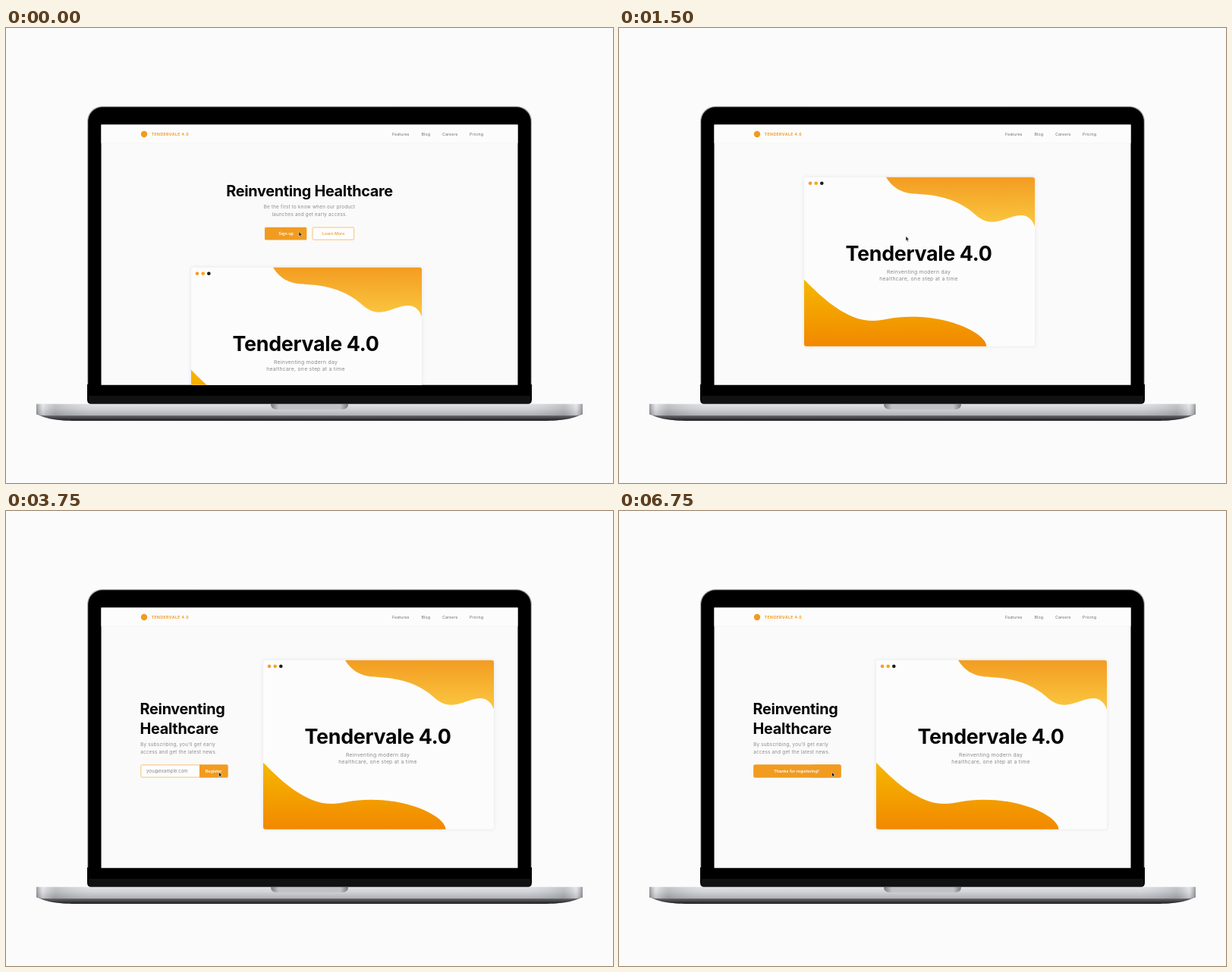
Recreate the animation shown at these times as an HTML page. Size 800 by 600 pixels, loop 8.25 s.

```html
<!DOCTYPE html>
<html lang="en">
<head>
<meta charset="utf-8">
<title>Landing page on a laptop</title>
<style>
html, body { margin: 0; width: 100%; height: 100%; overflow: hidden; background: #fbfbfb; }
svg { display: block; width: 100vw; height: 100vh; }
text { font-family: Inter, "Open Sans", sans-serif; }
.head { font-size: 19.8px; font-weight: 700; letter-spacing: -.28px; fill: #050505; }
.big { font-size: 26.8px; font-weight: 700; letter-spacing: -.3px; fill: #050505; }
.para { font-size: 6.2px; letter-spacing: .28px; fill: #8a8a8a; }
.sub { font-size: 6.8px; letter-spacing: .28px; fill: #8a8a8a; }
.nav { font-size: 5.3px; letter-spacing: .1px; fill: #707070; }
.brand { font-size: 5px; font-weight: 700; letter-spacing: .52px; fill: #f39a1e; }
.label { font-size: 5.3px; font-weight: 600; letter-spacing: .05px; fill: #fff; }
.mail { font-size: 5.9px; letter-spacing: .1px; fill: #858585; }
.mid { text-anchor: middle; }
.fill { fill: #f19b20; }
.line { fill: #fdfdfd; stroke: #f6bb66; stroke-width: .9; }
</style>
</head>
<body>
<svg viewBox="0 0 800 600">
  <defs>
    <linearGradient id="topWave" x2="0" y2="1">
      <stop stop-color="#f39c22"/><stop offset="1" stop-color="#fac840"/>
    </linearGradient>
    <linearGradient id="lowWave" x2="0" y2="1">
      <stop stop-color="#f5b800"/><stop offset="1" stop-color="#f28800"/>
    </linearGradient>
    <linearGradient id="silver" x2="0" y2="1">
      <stop stop-color="#dddfe3"/><stop offset=".4" stop-color="#cdcfd4"/><stop offset="1" stop-color="#a6a8ae"/>
    </linearGradient>
    <linearGradient id="ends">
      <stop stop-color="#555" stop-opacity=".5"/>
      <stop offset=".012" stop-color="#fff" stop-opacity=".3"/>
      <stop offset=".035" stop-color="#666" stop-opacity=".2"/>
      <stop offset=".1" stop-color="#fff" stop-opacity=".1"/>
      <stop offset=".9" stop-color="#fff" stop-opacity=".1"/>
      <stop offset=".965" stop-color="#666" stop-opacity=".2"/>
      <stop offset=".988" stop-color="#fff" stop-opacity=".3"/>
      <stop offset="1" stop-color="#555" stop-opacity=".5"/>
    </linearGradient>
    <linearGradient id="under" x2="0" y2="1">
      <stop offset=".55" stop-color="#77787c"/><stop offset="1" stop-color="#1c1c1e"/>
    </linearGradient>
    <linearGradient id="notch">
      <stop stop-color="#77787c"/><stop offset=".1" stop-color="#c0c2c6"/>
      <stop offset=".9" stop-color="#c0c2c6"/><stop offset="1" stop-color="#77787c"/>
    </linearGradient>
    <filter id="soft" x="-10%" y="-10%" width="120%" height="120%"><feGaussianBlur stdDeviation="2"/></filter>
    <clipPath id="screen"><rect x="125.5" y="127.6" width="549" height="343.2"/></clipPath>
    <path id="base" d="M40 495.7H760V509.5Q755 511 740 511H60Q45 511 40 509.5Z"/>
  </defs>

  <!-- laptop lid -->
  <rect x="107" y="103" width="586" height="393" rx="20" fill="#b5b6b9"/>
  <rect x="108.2" y="104.2" width="583.6" height="391.8" rx="19" fill="#000"/>
  <path d="M107 470H693V490Q693 496 687 496H113Q107 496 107 490Z" fill="#000"/>
  <path d="M109 485H691V490Q691 496 685 496H115Q109 496 109 490Z" fill="#101113"/>

  <g clip-path="url(#screen)">
    <rect x="125" y="127" width="550" height="345" fill="#fafafa"/>
    <g id="hero">
      <text class="head mid" x="400" y="222">Reinventing Healthcare</text>
      <text class="para mid" x="400" y="238.3">Be the first to know when our product</text>
      <text class="para mid" x="400" y="248.3">launches and get early access.</text>
      <rect class="fill" x="341" y="262.7" width="55.3" height="16.8" rx="1.5"/>
      <text class="label mid" x="369" y="273">Sign up</text>
      <rect class="line" x="404" y="263" width="54.7" height="16.2" rx="1.5"/>
      <text class="label mid" x="431.5" y="273" style="fill:#f2a63b">Learn More</text>
    </g>

    <g id="signup">
      <text class="head" x="176.6" y="268.3">Reinventing</text>
      <text class="head" x="176.6" y="293.8">Healthcare</text>
      <text class="para" x="177.2" y="310.3">By subscribing, you’ll get early</text>
      <text class="para" x="177.2" y="320.3">access and get the latest news.</text>
      <rect class="line" x="177.8" y="334.9" width="114.3" height="16.2" rx="1.5"/>
      <text class="mail" x="185" y="345">you@example.com</text>
      <path class="fill" d="M255 334.5H291Q292.5 334.5 292.5 336V350Q292.5 351.5 291 351.5H255Z"/>
      <text class="label mid" x="273.6" y="345">Register</text>
      <g id="thanks">
        <rect class="fill" x="177.3" y="334.5" width="115.2" height="17" rx="1.5"/>
        <text class="label mid" x="234" y="345">Thanks for registering!</text>
      </g>
    </g>

    <g id="card">
      <rect x="-1" y="-1" width="306" height="225" rx="4" fill="#000" opacity=".06" filter="url(#soft)"/>
      <rect width="304" height="223" rx="3" fill="#fcfcfc"/>
      <path fill="url(#topWave)" d="M108 0C119 18 134 22 154 22.5C182 24 206 32 224 48C234 57 242 61 256 58C272 55 294 39 304 65V3Q304 0 301 0Z"/>
      <path fill="url(#lowWave)" d="M0 135C28 164 62 193 96 189C102 189 118 184 142 184C196 184 240 207 240.5 223H3Q0 223 0 220Z"/>
      <circle cx="8" cy="8" r="2.3" fill="#f39a3a"/>
      <circle cx="15.7" cy="8" r="2.3" fill="#f3a90c"/>
      <circle cx="23.3" cy="8" r="2.3" fill="#1c1c1c"/>
      <text class="big mid" x="151" y="110.7">Tendervale 4.0</text>
      <text class="sub mid" x="151" y="127.3">Reinventing modern day</text>
      <text class="sub mid" x="151" y="136.7">healthcare, one step at a time</text>
    </g>

    <rect x="125" y="127" width="550" height="24" fill="#fcfcfc"/>
    <path d="M125 151.5H675" stroke="#f6f6f5"/>
    <circle cx="182" cy="140" r="4.2" fill="#f39a1e"/>
    <text class="brand" x="191.7" y="141.8">TENDERVALE 4.0</text>
    <text class="nav" x="509" y="141.8">Features</text>
    <text class="nav" x="547.5" y="141.8">Blog</text>
    <text class="nav" x="575" y="141.8">Careers</text>
    <text class="nav" x="611" y="142.2">Pricing</text>
    <path id="cursor" d="M0 0V6.2L1.4 5L2.4 7.3L3.5 6.8L2.5 4.6H4.4Z" fill="#111" stroke="#fff" stroke-width=".5"/>
  </g>

  <!-- laptop base -->
  <path d="M40 509C52 515 66 518 92 518H708C734 518 748 515 760 509V500H40Z" fill="url(#under)"/>
  <use href="#base" fill="url(#silver)"/>
  <use href="#base" fill="url(#ends)"/>
  <path d="M349 496H451Q451 503 443 503H357Q349 503 349 496Z" fill="url(#notch)"/>
</svg>
<script>
const LOOP = 8250, STEP = 250;
const el = id => document.getElementById(id);
const [hero, signup, card, thanks, cursor] = ["hero", "signup", "card", "thanks", "cursor"].map(el);

// eased progress between two times
function ease(t, from, to) {
  const p = Math.min(1, Math.max(0, (t - from) / (to - from)));
  return p < .5 ? 4 * p ** 3 : 1 - 4 * (1 - p) ** 3;
}
function place(node, x, y, opacity = 1) {
  node.setAttribute("transform", `translate(${x} ${y})`);
  node.setAttribute("opacity", opacity);
}

function draw(t) {
  const scroll = ease(t, 1000, 1500);
  const slide = ease(t, 1500, 2080);
  const aim = ease(t, 0, 700);
  const move = ease(t, 2500, 3500);
  place(hero, 0, -119 * scroll, 1 - scroll);
  place(card, 244 + 95 * slide, 315.7 - 119 * scroll);
  place(signup, 130 * (1 - slide), 0, slide);
  thanks.setAttribute("opacity", ease(t, 4000, 4500));
  place(cursor, 386 - 8 * aim - 97.5 * move, 268.5 + 6 * aim + 69.7 * move);
}

function tick(now) {
  draw(Math.floor(now % LOOP / STEP) * STEP);
  requestAnimationFrame(tick);
}
draw(0);
requestAnimationFrame(tick);
</script>
</body>
</html>
```
